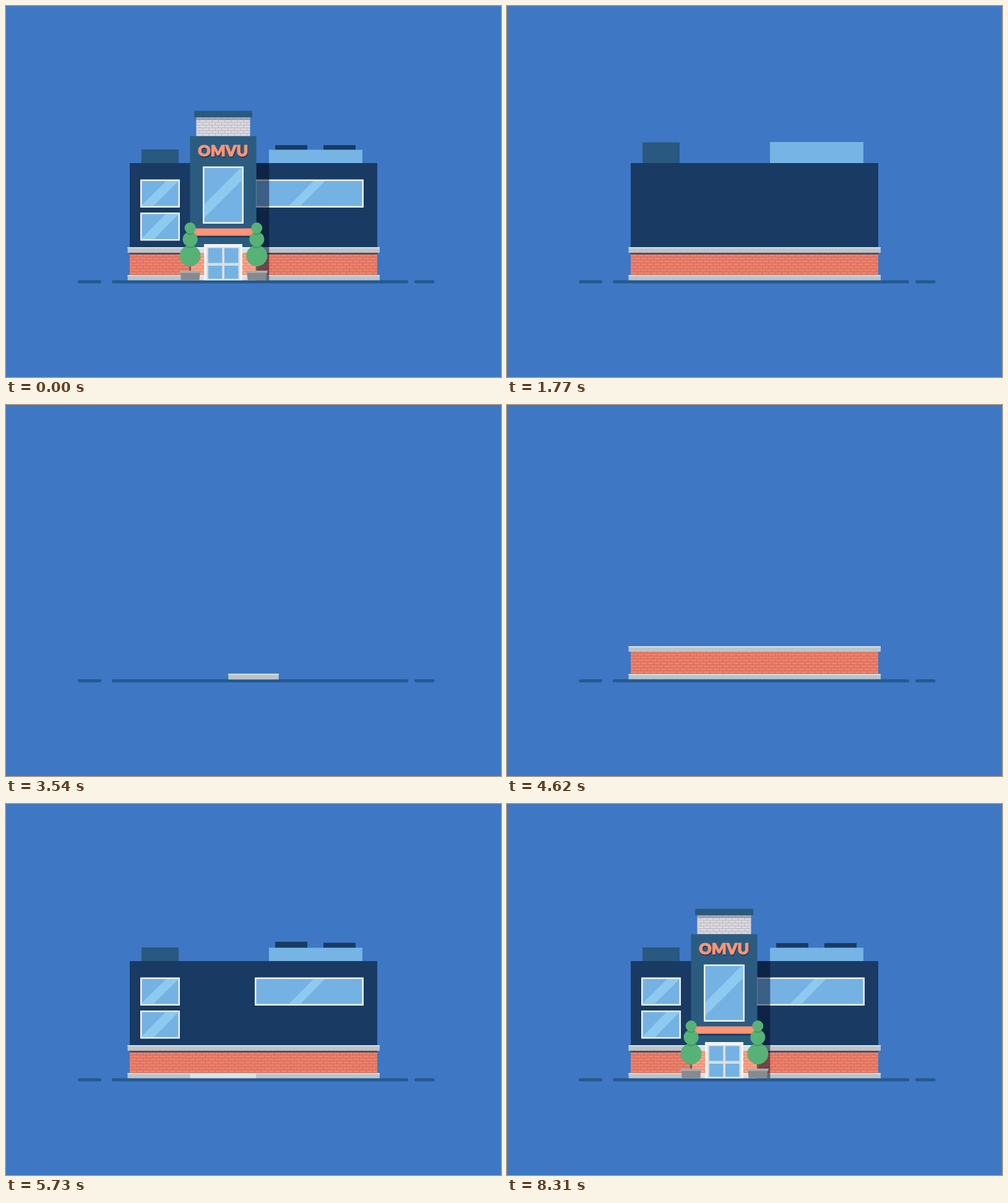
Write an HTML page with a canvas that moves like this. It is 800 px wide and 600 px high and loops after 9.03 s.

```html
<!DOCTYPE html>
<html lang="en">
<head>
<meta charset="utf-8">
<title>Building</title>
<style>
html, body { margin: 0; width: 100%; height: 100%; overflow: hidden; background: #3e77c4; }
canvas { display: block; }
</style>
</head>
<body>
<canvas id="stage" width="800" height="600"></canvas>
<script>
const ctx = document.getElementById('stage').getContext('2d');
const LOOP = 9030, STEP = 30;
const NAVY = '#193b63', TEAL = '#2b5c80', CORAL = '#ff9473', GLASS = '#74b2e3';

// Take-down: [loop time, build time] pairs
const REWIND = [[0, 8310], [30, 8280], [960, 6480], [1080, 6230], [1860, 4800], [2340, 3990], [2815, 3240]];

function buildTime(t) {
  for (let i = 1; i < REWIND.length; i++) {
    const [a, from] = REWIND[i - 1], [b, to] = REWIND[i];
    if (t < b) return from + (to - from) * (t - a) / (b - a);
  }
  return t;
}

let now = 0;

// Progress with overshoot; s sets how far it goes past 1
function pop(start, dur, s) {
  if (now <= start) return 0;
  if (now >= start + dur) return 1;
  const u = (now - start) / dur - 1;
  return Math.max(0, 1 + (s + 1) * u * u * u + s * u * u);
}

function rect(color, x0, y0, x1, y1) {
  ctx.fillStyle = color;
  ctx.fillRect(x0, y0, x1 - x0, y1 - y0);
}

function poly(color, ...p) {
  ctx.fillStyle = color;
  ctx.beginPath();
  for (let i = 0; i < p.length; i += 2) ctx.lineTo(p[i], p[i + 1]);
  ctx.fill();
}

function disc(color, x, y, r) {
  ctx.fillStyle = color;
  ctx.beginPath();
  ctx.arc(x, y, r, 0, Math.PI * 2);
  ctx.fill();
}

function scaled(cx, cy, sx, sy, draw) {
  if (sx <= 0 || sy <= 0) return;
  ctx.save();
  ctx.translate(cx, cy);
  ctx.scale(sx, sy);
  ctx.translate(-cx, -cy);
  draw();
  ctx.restore();
}

// Narrow piece grows tall first, then spreads sideways
function unfold(cx, cy, tall, wide, draw) {
  scaled(cx, cy, 0.2 + 0.8 * pop(wide, 270, 1.55), pop(tall, 225, 1.55), draw);
}

function clipped(x0, y0, x1, y1, draw) {
  ctx.save();
  ctx.beginPath();
  ctx.rect(x0, y0, x1 - x0, y1 - y0);
  ctx.clip();
  draw();
  ctx.restore();
}

function bricks(x0, y0, x1, y1, base, mortar, w, h) {
  clipped(x0, y0, x1, y1, () => {
    rect(base, x0, y0, x1, y1);
    for (let y = y1, row = 0; y > y0 - h; y -= h, row++) {
      rect(mortar, x0, y - 1, x1, y);
      for (let x = x0 + (row % 2 ? w / 2 : w); x < x1; x += w) rect(mortar, x, y - h, x + 0.9, y);
    }
  });
}

function ground() {
  ctx.strokeStyle = '#24598f';
  ctx.lineWidth = 5;
  ctx.lineCap = 'round';
  for (const [a, b] of [[118.5, 151.5], [173.5, 647.5], [662.5, 690]]) {
    ctx.beginPath();
    ctx.moveTo(a, 446);
    ctx.lineTo(b, 446);
    ctx.stroke();
  }
}

function ledge(y, h) {
  rect('#b9c4ca', 196.5, y, 604, y + h);
  rect('#dde2e5', 196.5, y, 604, y + 1.8);
}

function pane(x0, y0, x1, y1, sheen) {
  rect('#f3f2f1', x0, y0, x1, y1);
  rect(GLASS, x0 + 2.5, y0 + 2.5, x1 - 2.5, y1 - 2.5);
  clipped(x0 + 2.5, y0 + 2.5, x1 - 2.5, y1 - 2.5, () => poly('#8ecaf0', ...sheen));
}

function smallPane(x0, y0, x1, tall, wide, top, bottom, width) {
  const y1 = y0 + 45.5;
  unfold((x0 + x1) / 2, y0 + 22.75, tall, wide, () => pane(x0, y0, x1, y1,
    [top, y0 + 2.5, top + width, y0 + 2.5, bottom + width, y1 - 2.5, bottom, y1 - 2.5]));
}

function base() {
  scaled(404, 446, pop(3240, 300, 2.4), 1, ground);
  scaled(400, 390, 1, pop(4640, 240, 3.3), () => rect(NAVY, 200, 254, 600, 400));
  scaled(400, 435, 1, pop(3700, 270, 1.55), () =>
    bricks(200, 394, 600, 435, '#ee826c', '#cf6857', 10.6, 4.75));
  rect('rgba(25,45,75,.62)', 200, 399, 600, 399 + 3 * Math.min(1, pop(4640, 240, 1)));
  unfold(400, 439, 3420, 3540, () => ledge(435, 8.5));
  unfold(400, 394.5, 3975, 4340, () => ledge(390, 9));
}

function roof() {
  scaled(435, 232.5, 1, pop(5590, 300, 3.3), () => rect(NAVY, 435, 225, 487, 232.6));
  scaled(513, 232.5, 1, pop(5650, 300, 3.3), () => rect(NAVY, 513, 225, 565, 232.6));
  scaled(249, 254, 1, pop(4800, 300, 5.5), () => rect('#295880', 219, 232, 279, 254));
  scaled(500, 254, 1, pop(4840, 300, 5.5), () => rect('#75b4e4', 425, 232.5, 576, 254));
}

function wallWindows() {
  smallPane(217, 280.5, 281, 4980, 5280, 259, 218, 20);
  smallPane(217, 334, 281, 5020, 5300, 258, 218, 21);
  smallPane(402, 280.5, 578, 5060, 5320, 497, 457, 18.5);
}

// Lighter strip of plinth behind the door, wiped upward
function entrance() {
  const p = Math.min(1, Math.max(0, (now - 5700) / 360));
  if (!p) return;
  const top = 443.5 - 53.5 * p * (2 - p);
  clipped(297.5, top, 404.5, 443.5, () => {
    bricks(297.5, 399, 404.5, 435, '#ffa588', '#e97f67', 10.6, 4.75);
    for (const [y, h] of [[390, 9], [435, 8.5]]) {
      rect('#d9e1e5', 297.5, y, 404.5, y + h);
      rect('#f3f5f6', 297.5, y, 404.5, y + 1.8);
    }
  });
}

function chimney() {
  const p = pop(6843, 300, 3.3);
  if (!p) return;
  ctx.save();
  ctx.translate(0, 63 * (1 - p));
  bricks(307.3, 175, 394.6, 211, '#dcdae0', '#b7b4be', 10.2, 4.5);
  ctx.restore();
}

function cap() {
  unfold(351, 174.8, 7180, 7300, () => {
    rect('rgba(70,75,110,.35)', 307.3, 180, 394.6, 184.5);
    rect('#2a5a7e', 304, 169.5, 398, 180);
  });
}

function sign() {
  const p = pop(6981, 300, 1.55);
  ctx.font = '900 25px Lato, "Open Sans", sans-serif';
  ctx.textAlign = 'center';
  ctx.lineJoin = 'round';
  ctx.lineWidth = 1.2;
  const word = (color, x, y) => {
    ctx.fillStyle = ctx.strokeStyle = color;
    ctx.fillText('OMVU', x, y);
    ctx.strokeText('OMVU', x, y);
  };
  scaled(351, 235, 1, p, () => word(NAVY, 351.5, 245.2));
  scaled(351, 234, p, p, () => word(CORAL, 350.7, 243.2));
}

function doorLeaf() {
  rect('#d9dee2', 324, 390, 351, 442.5);
  rect(GLASS, 326.8, 391.5, 349.3, 415.5);
  rect(GLASS, 326.8, 420, 349.3, 441);
}

function door() {
  scaled(351, 443.5, 1, pop(6500, 250, 1.55), () => {
    rect('#f3f3f3', 320, 385, 382, 443.5);
    const open = 0.26 + 0.74 * pop(7020, 270, 1.55);
    scaled(324, 0, open, 1, doorLeaf);
    scaled(378.3, 0, open, 1, () => {
      ctx.translate(702.3, 0);
      ctx.scale(-1, 1);
      doorLeaf();
    });
  });
}

function tower() {
  scaled(404.5, 254, pop(6843, 300, 3.3), 1, () => rect('rgba(2,14,40,.5)', 404.5, 254, 425.3, 443.5));
  chimney();
  scaled(351, 390, 1, pop(6240, 300, 3.3), () => rect(TEAL, 297.5, 210.5, 404.5, 390));
  cap();
  unfold(351, 306, 6740, 7020, () => pane(318, 259.5, 384, 352, [321, 320, 378, 263, 400, 263, 321, 342]));
  rect(NAVY, 297.5, 371.5, 404.5, 371.5 + 3 * pop(7180, 240, 1));
  door();
  unfold(351, 365.8, 6560, 6680, () => rect(CORAL, 292, 359.7, 410, 371.5));
  sign();
}

function tree(x, pot, trunk, big, mid, top) {
  scaled(x, 430, 1, pop(trunk, 240, 1), () => rect('#7b5a45', x - 1.5, 410, x + 1.5, 430));
  unfold(x, 436, pot, pot + 140, () => {
    poly('#878b8e', x - 16, 431, x + 16, 431, x + 14.8, 443.5, x - 14.8, 443.5);
    rect('#a7adb1', x - 17.3, 428, x + 17.3, 431.7);
  });
  let below = null;
  for (const [y, r, start] of [[404, 17, big], [377.3, 12, mid], [359, 9, top]]) {
    const size = r * pop(start, 300, 2);
    if (!size) continue;
    if (below) {
      ctx.save();
      ctx.beginPath();
      ctx.arc(x, below[0], below[1], 0, Math.PI * 2);
      ctx.clip();
      disc('#459b69', x, y + 2.5, size);
      ctx.restore();
    }
    disc('#57b277', x, y, size);
    below = [y, size];
  }
}

function draw(time) {
  now = buildTime(time);
  rect('#3e77c4', 0, 0, 800, 600);
  base();
  roof();
  wallWindows();
  entrance();
  tower();
  tree(297.6, 7380, 7680, 7780, 7900, 7950);
  tree(405.3, 7440, 7760, 7950, 7990, 8010);
}

const begin = performance.now();
function tick() {
  const t = (performance.now() - begin) % LOOP;
  draw(Math.floor(t / STEP) * STEP);
  requestAnimationFrame(tick);
}
tick();
</script>
</body>
</html>
```
